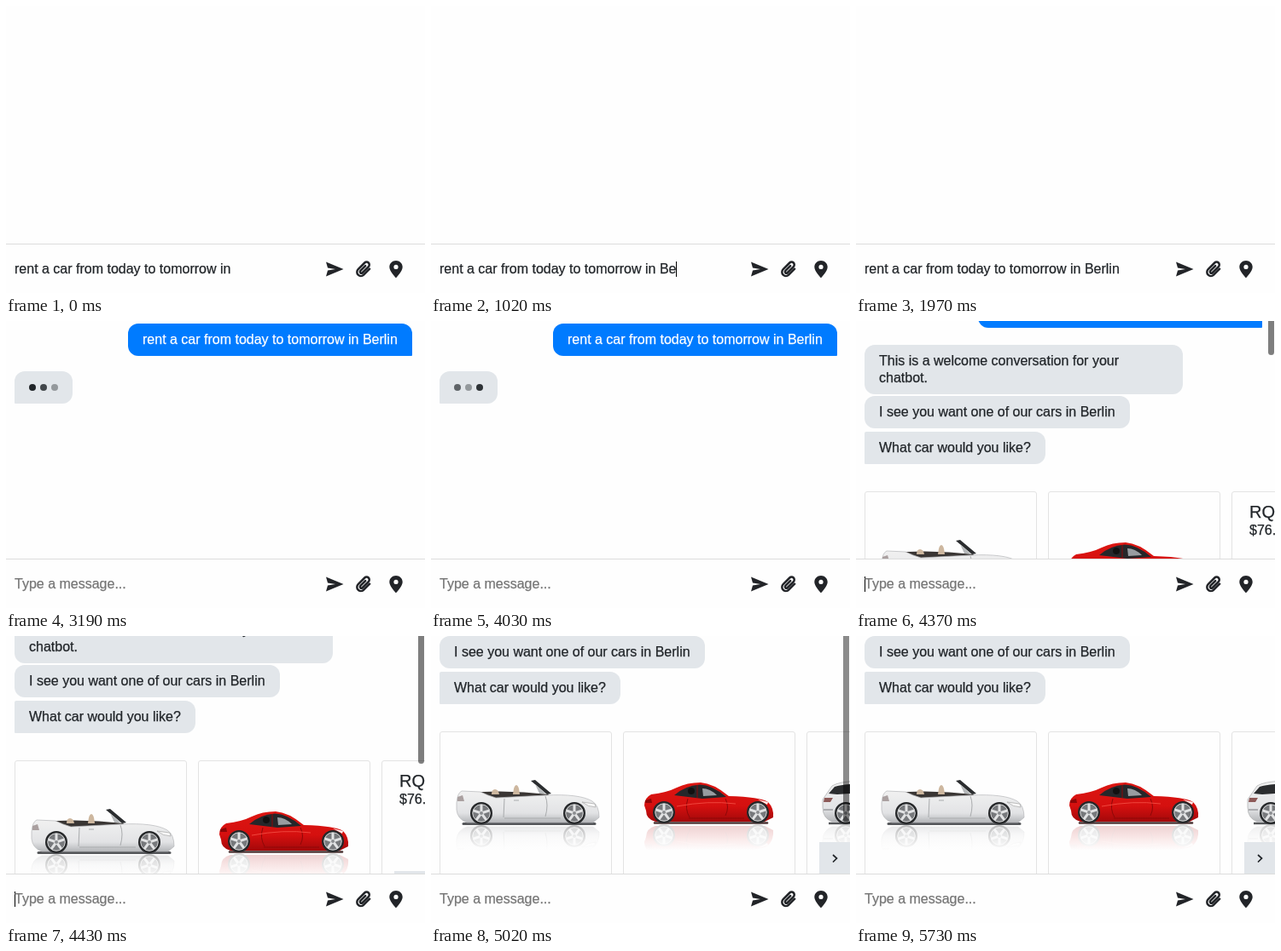
These frames come from a looping animation (491 px wide and 337 px high, 5880 ms). An HTML page:

```html
<!DOCTYPE html>
<html lang="en">
<head>
<meta charset="utf-8">
<title>Car rental chat</title>
<style>
  html, body { margin: 0; width: 100%; height: 100%; overflow: hidden; }
  body { position: relative; background: #fefefe; color: #212529; font: 16px/20px "Liberation Sans", Arial, sans-serif; -webkit-text-stroke: .25px; }
  #view { position: absolute; left: 0; top: 0; width: 491px; height: 279px; overflow: hidden; }
  .bubble, .card, #bar, #next { position: absolute; box-sizing: border-box; }
  .bubble { left: 10px; padding: 9px 17px; border-radius: 12px; background: #e2e6ea; white-space: nowrap; }
  .last { border-bottom-left-radius: 1px; }
  #reply .last { border-top-left-radius: 2px; }
  .mine { left: 143px; top: 3px; width: 333px; background: #007bff; color: #fff; border-bottom-right-radius: 1px; }
  #typing { top: 59px; width: 68px; height: 38px; padding-top: 15px; display: flex; gap: 5px; }
  #typing i { flex: none; width: 8px; height: 8px; border-radius: 4px; background: #212529; }
  .card { top: 233px; width: 202px; height: 320px; border: 1px solid #e3e3e3; border-radius: 3px; overflow: hidden; line-height: 22px; background: #fefefe; }
  .card svg { display: block; }
  .card div { padding: 12px 20px; }
  .card b { display: block; font-size: 20px; font-weight: 400; }
  #next { left: 455px; top: 363px; width: 36px; height: 38px; background: #e2e6ea; }
  #bar { left: 483px; width: 7px; height: 300px; border-radius: 4px; background: #000; }
  #foot { position: absolute; left: 0; top: 279px; width: 491px; height: 57px; border-top: 1px solid #dcdcdc; }
  #foot svg { position: absolute; left: 0; top: -280px; }
  #field { position: absolute; left: 10px; top: 19px; display: flex; white-space: pre; }
  #caret { width: 1px; height: 18px; margin: 1px -1px 0 0; background: #000; }
  #hint { color: #757575; }
</style>
</head>
<body>
<div id="view">
  <div id="log">
    <div class="bubble mine" id="sent">rent a car from today to tomorrow in Berlin</div>
    <div class="bubble last" id="typing"><i></i><i></i><i></i></div>
    <div id="reply">
      <div class="bubble" style="top:61px;width:373px">This is a welcome conversation for your<br>chatbot.</div>
      <div class="bubble" style="top:121px">I see you want one of our cars in Berlin</div>
      <div class="bubble last" style="top:163px">What car would you like?</div>
      <div class="card" style="left:10px">
        <svg width="200" height="170" viewBox="11 113 200 170">
          <defs>
            <linearGradient id="fade" x2="0" y2="1"><stop stop-color="#fefefe" stop-opacity="0"/><stop offset="1" stop-color="#fefefe"/></linearGradient>
            <linearGradient id="white" x2="0" y2="1"><stop stop-color="#f1f1f1"/><stop offset=".7" stop-color="#e2e3e5"/><stop offset="1" stop-color="#b4b6b9"/></linearGradient>
            <linearGradient id="red" x2="0" y2="1"><stop stop-color="#dc1612"/><stop offset=".6" stop-color="#d5100f"/><stop offset="1" stop-color="#a3080a"/></linearGradient>
            <g id="wheel">
              <circle r="13" fill="#26282a"/><circle r="10.5" fill="#77797c"/>
              <path d="M0 0V-10M0 0-9.5-3.1M0 0 9.5-3.1M0 0-5.9 8.1M0 0 5.9 8.1" stroke="#e2e3e4" stroke-width="3"/>
              <circle r="10.2" fill="none" stroke="#d6d7d8"/><circle r="2" fill="#8b8d90"/>
            </g>
          </defs>
          <path d="M38 220.500H192" stroke="#55575a" stroke-width="3" stroke-linecap="round"/>
          <g id="car1">
            <path d="M42 184Q90 180 138 186L135 190H50z" fill="#3a3634"/>
            <path d="M71 186q0-6 4-6t5 6zM96 186q1-11 4-11t4 11z" fill="#cdb79f"/>
            <path d="M30 196Q31 184 36 182L58 183Q66 187 76 190L134 187Q174 185 189 194Q197 199 197 213L190 219H42Q31 215 30 204z" fill="url(#white)" stroke="#b5b7b9" stroke-width=".7"/>
            <path d="M117 170l5-1 19 16-5 1z" fill="#2b2d2f"/>
            <path d="M122 174l12 11h-7z" fill="#b5b8ba"/>
            <path d="M86 191l-1 22M86 214h66M134 188q4 10 0 24M97 193h6" stroke="#a9abad" fill="none"/>
            <path d="M177 195l15 2 1 4q-9 0-16-6z" fill="#f8f8f8" stroke="#a5a5a5" stroke-width=".7"/>
            <path d="M31 189l6-2 2 7h-8z" fill="#aaa0a0"/>
            <use href="#wheel" x="59" y="208"/><use href="#wheel" x="168" y="208"/>
          </g>
          <use href="#car1" transform="matrix(1 0 0 -1 0 443)" opacity=".3"/>
          <path d="M11 222h200v30H11z" fill="url(#fade)"/><path d="M11 251h200v32H11z" fill="#fefefe"/>
        </svg>
        <div><b>Norvenna R-<br>Crest Cabriolet</b>$91.00</div>
      </div>
      <div class="card" style="left:225px">
        <svg width="200" height="170" viewBox="226 113 200 170">
          <path d="M262 219.500H394" stroke="#4d3636" stroke-width="2.500" stroke-linecap="round"/>
          <g id="car2">
            <path d="M250 199Q250 190 258 186Q276 184 288 178Q300 172 316 172Q331 173 349 188Q386 189 395 195Q402 202 401 213L391 218H263Q252 215 252 205z" fill="url(#red)"/>
            <path d="M285 187Q297 176 315 174.500Q330 175 346 189L318 191z" fill="#25272a"/>
            <path d="M318 179q9 0 17 8l-16 1z" fill="#989da1"/>
            <path d="M312 175v15M345 191q5 10 0 20M301 191q-4 12 2 22M302 214h65" stroke="#8d0808" fill="none"/>
            <path d="M288 200Q325 193 357 197" stroke="#f0463d" fill="none"/>
            <path d="M383 192l12 3-1 3z" fill="#fff0ee"/>
            <path d="M251 193l7-2 1 5h-8z" fill="#8c0607"/>
            <circle cx="305" cy="182" r="4" fill="#111"/>
            <use href="#wheel" x="273" y="207"/><use href="#wheel" x="383" y="207"/>
          </g>
          <use href="#car2" transform="matrix(1 0 0 -1 0 441)" opacity=".18"/>
          <path d="M226 222h200v30H226z" fill="url(#fade)"/><path d="M226 251h200v32H226z" fill="#fefefe"/>
        </svg>
        <div><b>Tovena KR-7</b>$53.00</div>
      </div>
      <div class="card" style="left:440px">
        <svg width="200" height="170" viewBox="441 113 200 170">
          <path d="M466 220H600" stroke="#55575a" stroke-width="2.500"/>
          <g id="car3">
            <path d="M459 192L470 176Q478 171 500 170L560 171L610 194V218H470Q459 214 459 201z" fill="url(#white)" stroke="#a9abad" stroke-width=".7"/>
            <path d="M466 185L473 177Q486 173 520 173V183L476 186z" fill="#2b2d2f"/>
            <path d="M461 190h10l-3 5h-8z" fill="#8d5a58"/>
            <path d="M460 204h11" stroke="#77797c"/>
            <use href="#wheel" x="486" y="208"/>
          </g>
          <use href="#car3" transform="matrix(1 0 0 -1 0 442)" opacity=".2"/>
          <path d="M441 222h200v30H441z" fill="url(#fade)"/><path d="M441 251h200v32H441z" fill="#fefefe"/>
        </svg>
        <div><b>RQ 4 Tourer</b>$76.00</div>
      </div>
    </div>
  </div>
  <div id="bar"></div>
  <div id="next"><svg width="36" height="38"><path d="M16 15l4.500 4-4.500 4.500" fill="none" stroke="#212529" stroke-width="1.700"/></svg></div>
</div>
<div id="foot">
  <div id="field"><span id="typed"></span><i id="caret"></i><span id="hint">Type a message...</span></div>
  <svg width="491" height="337" fill="#222428">
    <path transform="translate(373 297)" d="M2 20.500L22.500 12 2 3.500 4 10.500l9 1.500-9 1.500z"/>
    <path transform="translate(419.3 309) rotate(45)" d="M4.600-5V4.800A4.600 4.600 0 0 1-4.600 4.800V-6A3.200 3.200 0 0 1 1.800-6V4.200A1.600 1.600 0 0 1-1.400 4.200V-4" fill="none" stroke="#222428" stroke-width="2.500" stroke-linecap="round"/>
    <path transform="translate(445 297)" d="M12 2C7.700 2 4.300 5.300 4.300 9.500c0 5.200 7.700 12.800 7.700 12.800s7.700-7.600 7.700-12.800C19.700 5.300 16.300 2 12 2zm0 10a2.600 2.600 0 1 1 0-5.200 2.600 2.600 0 0 1 0 5.200z"/>
  </svg>
</div>
<script>
const LOOP = 5880, SEND = 2380, TYPING = 2740, REPLY = 4310, STEP = 60, END = 121;
const KEYS = [840, 1020, 1080, 1250, 1370, 1490];
const $ = id => document.getElementById(id);
const clamp = x => Math.max(0, Math.min(1, x));
const show = (el, on) => { el.style.visibility = on ? "visible" : "hidden"; };
const dots = [...document.querySelectorAll("#typing i")];
const photos = [...document.querySelectorAll(".card > svg")];

// Each dot darkens, holds and fades, 300 ms after the one before it.
function dotAlpha(t, i) {
  const age = t - TYPING - i * 300;
  if (age < 0) return 0.4;
  const p = age % 1200;
  const k = clamp(Math.min(p, 900 - p) / 300);
  return 0.4 + 0.6 * Math.sin(k * Math.PI / 2);
}

function scrollAt(t) {
  if (t < REPLY) return 0;
  const n = Math.floor((t - REPLY) / STEP);
  if (n >= 3) return END;
  return Math.round(END * (1 - Math.cos(Math.PI * (0.058 + n * 0.294))) / 2);
}

function caretOn(t) {
  if (t < SEND) return t >= 420 && t < 1970;
  return Math.floor((t - SEND) / 478.5) % 2 === 0;
}

function draw(t) {
  const sent = t >= SEND, replied = t >= REPLY;
  const count = KEYS.filter(k => t >= k).length;
  $("typed").textContent = sent ? "" : "rent a car from today to tomorrow in " + "Berlin".slice(0, count);
  show($("hint"), sent);
  show($("caret"), caretOn(t));
  show($("sent"), sent);
  show($("typing"), sent && !replied);
  dots.forEach((d, i) => { d.style.opacity = dotAlpha(t, i); });

  const y = scrollAt(t);
  show($("reply"), replied);
  show($("next"), replied);
  $("log").style.transform = $("next").style.transform = `translateY(${-y}px)`;
  photos.forEach((p, i) => {
    p.style.display = t >= REPLY + STEP * (i < 2 ? 1 : 3) ? "block" : "none";
  });
  $("bar").style.top = -81 - (END - y) * 2.03 + "px";
  $("bar").style.opacity = y > 1 ? 0.5 * clamp(1 - (t - 5000) / 230) : 0;
}

const start = performance.now();
function frame() {
  draw((performance.now() - start) % LOOP);
  requestAnimationFrame(frame);
}
frame();
</script>
</body>
</html>
```
